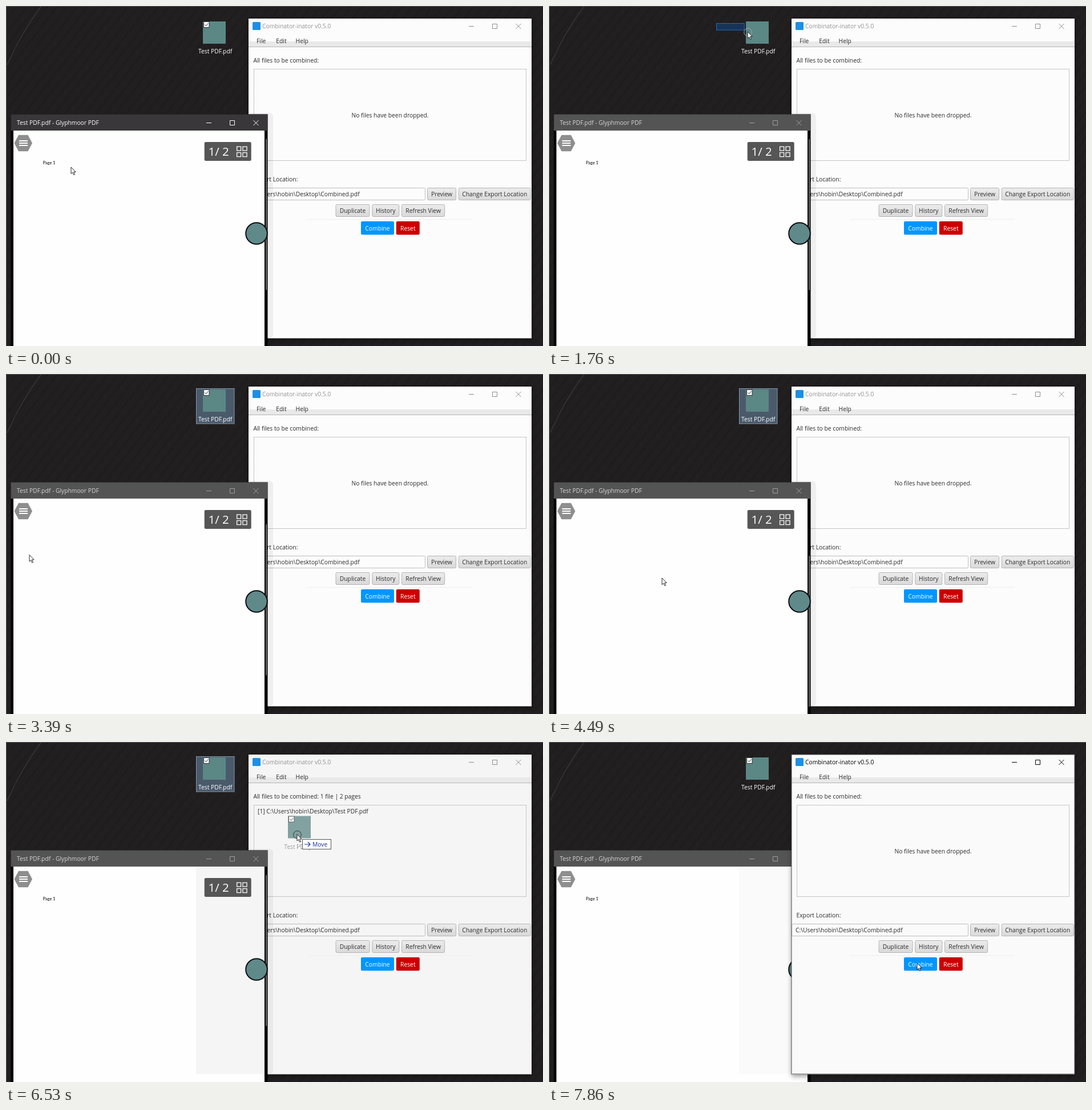
Write an HTML page that moves like this. It is 941 by 595 pixels and loops after 8000 ms.

```html
<!DOCTYPE html>
<html lang="en">
<head>
<meta charset="utf-8">
<title>Combinator-inator</title>
<style>
html, body { margin: 0; width: 100%; height: 100%; overflow: hidden; background: #211e1f; }
svg { display: block; width: 941px; height: 595px; }
text { font: 10.3px "Open Sans", "Noto Sans", sans-serif; white-space: pre; }
.mid { text-anchor: middle; }
#right text { fill: #2b2b2b; }
#right .lit { fill: #fff; }
.caption { fill: #fff; }
#ghost .caption { filter: drop-shadow(1px 1px 0.6px #555); }
.page { font: 7.4px Lato, sans-serif; fill: #000; }
.badge { font-size: 20.5px; fill: #fff; }
.line { fill: none; stroke-width: 1; }
</style>
</head>
<body>
<svg id="stage" viewBox="0 0 941 595" xmlns="http://www.w3.org/2000/svg"></svg>
<script>
const LOOP = 8000, TICK = 130, PHASE = 24;
const stage = document.getElementById('stage');

const text = (x, y, s, cls = '', more = '') =>
  `<text x="${x}" y="${y}" class="${cls}" ${more}>${s}</text>`;
const rect = (x, y, w, h, fill, more = '') =>
  `<rect x="${x}" y="${y}" width="${w}" height="${h}" fill="${fill}" ${more}/>`;

// A run of buttons from left to right: [label, width, fill]
function row(x, y, items) {
  return items.map(([label, w, fill]) => {
    const box = fill ? rect(x, y - .3, w, 23.5, fill, 'rx="2.5"')
      : rect(x + .5, y + .5, w - 1, 21, 'url(#face)', 'rx="2" stroke="#b4b4b4"');
    const out = box + text(x + w / 2, y + (fill ? 15.5 : 14.8), label, fill ? 'mid lit' : 'mid');
    x += w + 3.8;
    return out;
  }).join('');
}

// Minimise, maximise and close, evenly spaced
const controls = (id, x, y) =>
  `<path id="${id}" class="line" d="M${x} ${y + .5}h9M${x + 41.5} ${y - 3.5}h8v8h-8z
    M${x + 82.5} ${y - 4}l9 9m0 -9l-9 9"/>`;

const fileIcon = check =>
  rect(345, 27, 40, 39, '#5b8785') +
  `<g id="${check}">${rect(346.5, 27.5, 9.5, 10, '#fff', 'stroke="#333"')}
   <path class="line" stroke="#222" d="M348.5 32.5l2 2.3 3.8 -4.5"/></g>` +
  text(337, 83, 'Test PDF.pdf', 'caption');

const defs = `<defs>
  <linearGradient id="face" x2="0" y2="1"><stop stop-color="#ececec"/><stop offset="1" stop-color="#d9d9d9"/></linearGradient>
  <pattern id="stripes" width="14" height="14" patternUnits="userSpaceOnUse" patternTransform="rotate(38)">
    <rect width="14" height="14" fill="#221f20"/><rect width="3" height="14" fill="#1f1c1d"/>
  </pattern>
  <filter id="soft" x="-10%" y="-10%" width="120%" height="120%"><feGaussianBlur stdDeviation="4"/></filter>
  <clipPath id="view"><rect x="13" y="218" width="440" height="377"/></clipPath>
</defs>`;

const desktop = rect(0, 0, 941, 595, 'url(#stripes)') +
  `<path class="line" stroke="#454243" d="M62 0Q28 45 2 103"/>
   <path class="line" stroke="#5a5859" d="M.5 595V.5H941"/>` +
  rect(333.5, 25.5, 66.5, 61.5, '#4a5a6b', 'id="glow" stroke="#7f98b0"') +
  fileIcon('check') +
  rect(293.5, 30.5, 0, 0, '#143a66', 'id="band" fill-opacity=".8" stroke="#1f6cb8"');

const right = `<g id="right">
  ${rect(425, 24, 497, 561, '#000', 'opacity=".4" filter="url(#soft)"')}
  ${rect(425, 22, 496, 559.5, '#fcfcfc', 'id="pane"')}
  ${rect(425, 62, 496, 9, '#e9e9e9')}
  ${rect(425, 71, 496, 1, '#b5b5b5')}
  ${rect(432, 28, 14, 14, '#1b8fe9', 'rx="1.5"')}
  ${text(449, 39.3, 'Combinator-inator v0.5.0', '', 'id="title"')}
  ${controls('rightCtl', 811, 35)}
  ${['File', 'Edit', 'Help'].map((s, i) => text(439 + 34.3 * i, 64.7, s)).join('')}
  ${text(433.5, 99.2, '', '', 'id="head"')}
  ${rect(434.5, 110.5, 477, 160, 'none', 'stroke="#c6c6c6"')}
  ${text(673, 194.6, 'No files have been dropped.', 'mid', 'id="none"')}
  ${[1, 2].map(n => text(441, 107.5 + 17.4 * n,
    `[${n}] C:\\Users\\hobin\\Desktop\\Test PDF.pdf`, '', `id="row${n}"`)).join('')}
  ${text(433.5, 306.8, 'Export Location:')}
  ${rect(425.5, 318.5, 309, 21, 'none', 'rx="2" stroke="#bcbcbc"')}
  ${text(432, 332.6, 'C:\\Users\\hobin\\Desktop\\Combined.pdf')}
  ${row(738, 318, [['Preview', 51], ['Change Export Location', 127]])}
  ${row(577.5, 347, [['Duplicate', 60], ['History', 48], ['Refresh View', 76]])}
  ${rect(528, 373, 288, 1, '#eeeeee')}
  ${row(622, 377, [['Combine', 58, '#0096ff'], ['Reset', 41, '#cc0000']])}
  ${rect(425, 22, 496, 559, 'none', 'id="edge" stroke="#555"')}
</g>`;

const cells = [0, 1, 2, 3].map(i =>
  `M${404.6 + 10.4 * (i % 2)} ${246.2 + 10.4 * (i >> 1)}h7v7h-7z`).join('');

const left = `<g id="left">
  ${rect(425, 187, 43, 394, '#000', 'rx="6" opacity=".05"')}
  ${rect(8.5, 189.5, 450, 406, '#000')}
  ${rect(8.5, 189.5, 450, 28.5, '#39373a', 'id="bar"')}
  ${text(19, 208.2, 'Test PDF.pdf - Glyphmoor PDF', '', 'id="docName"')}
  ${controls('leftCtl', 351, 204)}
  ${rect(13, 218, 440, 377, '#fefefe')}
  ${rect(333, 218, 120, 363, '#f5f5f5', 'id="tint"')}
  <g clip-path="url(#view)"><g id="sheet">${text(64.7, 277.4, 'Page 1', 'page')}</g></g>
  ${rect(455, 233, 2, 264, '#6e6e6e', 'id="thumb"')}
  <path fill="#8e8e8e" d="M14.5 240l7.5 -14.3h16.5l7.5 14.3 -7.5 14.3h-16.5z"/>
  <path class="line" stroke="#fff" style="stroke-width:1.8" d="M23 236h15M23 240h15M23 244h15"/>
  <g id="badge">
    ${rect(347.7, 238, 82, 33, '#565656', 'rx="2.5"')}
    ${text(354.5, 262.3, '1/ 2', 'badge')}
    <path class="line" stroke="#fff" style="stroke-width:1.3" d="${cells}"/>
  </g>
  <circle cx="439" cy="398" r="18.8" fill="#5f8a89" stroke="#0c0c0c" stroke-width="2"/>
</g>`;

const pointer = `<g id="ghost" opacity=".75">${fileIcon('ghostCheck')}</g>
  <g id="tip">
    ${rect(.5, .5, 50, 17, '#fff', 'stroke="#555"')}
    <path class="line" stroke="#1c36b8" style="stroke-width:1.2" d="M4 9h10M10 5l4 4 -4 4"/>
    ${text(18, 12.8, 'Move', '', 'fill="#1c2f9e"')}
  </g>
  <g id="cursor">
    <circle id="ring" cx=".5" cy=".8" r="6.8" class="line"/>
    <path fill="#fff" stroke="#111" stroke-width=".9"
      d="M0 0V11.6L2.7 9.1 4.6 13.6 6.5 12.8 4.6 8.4H8.2z"/>
  </g>`;

stage.innerHTML = defs + desktop + right + left + pointer;
const el = {};
stage.querySelectorAll('[id]').forEach(n => el[n.id] = n);

// Story beats
const SELECT = [1400, 1800];
const DRAGS = [[5200, 5720], [6130, 6640]];
const COMBINE = 7690;

// Pointer stops: arrival time, x, y
const STOPS = [
  [0, 114, 282], [400, 54, 285], [1080, 368, 216],
  [SELECT[0], 293, 30], [1714, 348, 45], [2490, 41, 316.5], [4000, 198, 357],
  [DRAGS[0][0], 391, 54], [5614, 552, 134], [DRAGS[1][0], 361, 59], [6450, 510, 161.5],
  [7400, 645, 387]];
const LEG = 420;   // longest move between two stops
const LAG = 60;    // drawn feedback trails the pointer

function ease(t, a, b) {
  const p = Math.min(1, Math.max(0, (t - a) / (b - a)));
  return p * p * (3 - 2 * p);
}

function pointerAt(t) {
  let [from, x, y] = STOPS[0];
  for (const [to, nx, ny] of STOPS.slice(1)) {
    const p = ease(t, Math.max(from, to - LEG), to);
    x += (nx - x) * p;
    y += (ny - y) * p;
    from = to;
  }
  return [x, y];
}

const within = (t, [a, b]) => t >= a && t < b;
const show = (node, on) => node.setAttribute('visibility', on ? 'inherit' : 'hidden');
const set = (node, attrs) => { for (const k in attrs) node.setAttribute(k, attrs[k]); };
const move = (node, x, y) => node.setAttribute('transform', `translate(${x} ${y})`);

function drawWindows(t, front) {
  const active = t < SELECT[0];
  const [low, high] = front ? [el.left, el.right] : [el.right, el.left];
  if (low.nextElementSibling !== high) stage.insertBefore(low, high);

  const dragged = t > DRAGS[0][0];
  const shade = front ? '#fafafa' : dragged ? '#f5f5f5' : '#fcfcfc';
  set(el.pane, { fill: shade });
  set(el.tint, { fill: shade });
  show(el.tint, dragged);
  show(el.edge, front);
  el.title.style.fill = front ? '#000' : '#929292';
  set(el.rightCtl, { stroke: front ? '#000' : '#8c8c8c' });
  set(el.bar, { fill: active ? '#39373a' : '#555455' });
  set(el.docName, { fill: active ? '#fff' : '#d6d6d6' });
  set(el.leftCtl, { stroke: active ? '#fff' : '#a0a0a0' });
}

function drawDocument(t) {
  const scroll = 85 * (ease(t, 2550, 4350) - ease(t, 4650, 5000));
  move(el.sheet, 0, -scroll * 2.2);
  move(el.thumb, 0, scroll);
  show(el.thumb, t < 6760);
  show(el.badge, t < 7150);
}

function drawList(t, front) {
  const count = front ? 0 : DRAGS.filter(d => t >= d[1]).length;
  el.head.textContent = 'All files to be combined:' +
    (count ? ` ${count} file${count > 1 ? 's' : ''} | ${count * 2} pages` : '');
  show(el.none, !count);
  show(el.row1, count > 0);
  show(el.row2, count > 1);
}

function drawPointer(t, front) {
  const [x, y] = pointerAt(t);
  const [lagX, lagY] = pointerAt(t - LAG);
  const selecting = within(t, SELECT);
  const drag = DRAGS.find(d => within(t, d));

  show(el.glow, t >= SELECT[1] && !front);
  show(el.check, !selecting);
  show(el.band, selecting);
  set(el.band, { width: Math.max(0, lagX - 294), height: Math.max(0, lagY - 32) });

  move(el.cursor, x, y);
  show(el.ring, selecting || drag);
  set(el.ring, { stroke: selecting ? '#a8a8a8' : '#333' });
  show(el.ghost, drag);
  show(el.tip, drag);
  if (drag) {
    const [px, py] = pointerAt(drag[0]);
    move(el.ghost, x - px, y - py);
    move(el.tip, Math.round(lagX + 9), Math.round(lagY + 8));
  }
}

function draw(time) {
  const t = Math.max(0, PHASE + TICK * Math.floor((time - PHASE) / TICK));
  const front = t >= COMBINE;
  drawWindows(t, front);
  drawDocument(t);
  drawList(t, front);
  drawPointer(t, front);
}

let begin;
function frame(now) {
  begin ??= now;
  draw((now - begin) % LOOP);
  requestAnimationFrame(frame);
}
draw(0);
requestAnimationFrame(frame);
</script>
</body>
</html>
```
